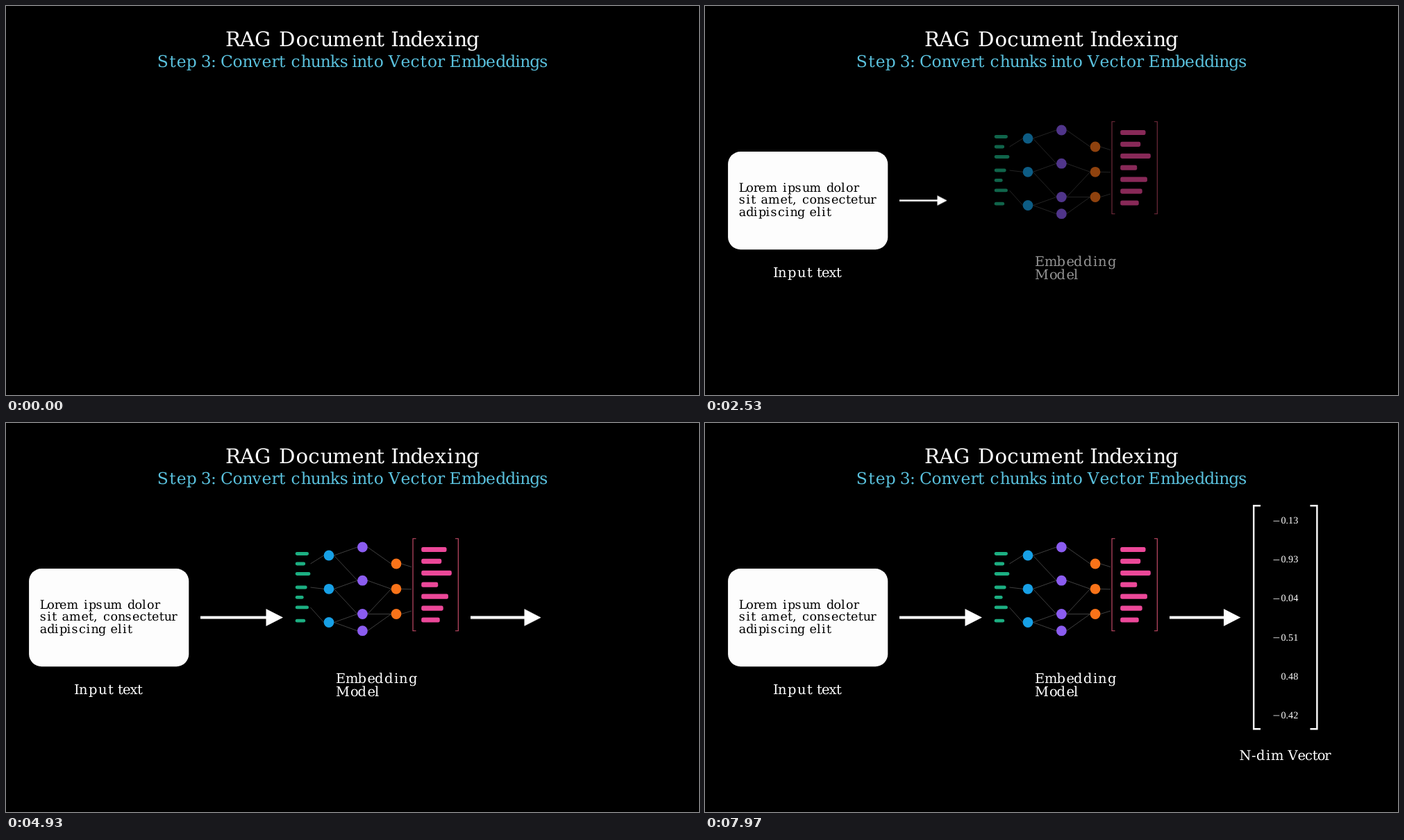
Animation, 998 px wide and 561 px high, one loop 8 s. Source, as an HTML page:

```html
<!DOCTYPE html>
<html lang="en">
<head>
<meta charset="utf-8">
<title>RAG Document Indexing</title>
<style>
  html, body { margin: 0; width: 100%; height: 100%; overflow: hidden; background: #000; }
  svg { display: block; width: 100vw; height: 100vh; }
  text { font-family: "DejaVu Serif", serif; fill: #fff; text-rendering: geometricPrecision; }
  .num { font: 14.2px "Liberation Serif", serif; text-anchor: end; }

  /* sigmoid ease, sampled every 5 % */
  .step {
    animation: 8s infinite both;
    animation-timing-function: linear(0, .0044, .0114, .0229, .0413, .0701, .114, .1781, .2658, .3759, .5,
      .6241, .7342, .8219, .886, .9299, .9587, .9771, .9886, .9956, 1);
  }
  #input { animation-name: fade-input; }
  #model { animation-name: fade-model; }
  #vector { animation-name: fade-vector; }
  #arrow1 { animation-name: grow-first; transform-origin: 280px 280.5px; }
  #arrow2 { animation-name: grow-second; transform-origin: 669px 280.5px; }
  @keyframes fade-input { 0% { opacity: 0 } 12.5%, 100% { opacity: 1 } }
  @keyframes fade-model { 0%, 25% { opacity: 0 } 37.5%, 100% { opacity: 1 } }
  @keyframes fade-vector { 0%, 62.5% { opacity: 0 } 75%, 100% { opacity: 1 } }
  @keyframes grow-first { 0%, 25% { transform: scale(0) } 37.5%, 100% { transform: scale(1) } }
  @keyframes grow-second { 0%, 50% { transform: scale(0) } 62.5%, 100% { transform: scale(1) } }

  /* each letter is outlined, then filled; the group hides the delayed wrap-around */
  #written { animation: reveal 8s linear infinite both; }
  #written tspan {
    stroke: #fff;
    stroke-dasharray: var(--len);
    animation: write 8s linear infinite;
  }
  @keyframes reveal { 0%, 75% { opacity: 0 } 75.01%, 100% { opacity: 1 } }
  @keyframes write {
    0%, 10%, 79.1667%, 100% { fill-opacity: 1; stroke-width: 0px; stroke-dashoffset: 0px }
    10.01%, 75% { fill-opacity: 0; stroke-width: 1.4px; stroke-dashoffset: var(--len) }
    77.0833% { fill-opacity: 0; stroke-width: 1.4px; stroke-dashoffset: 0px }
  }
</style>
</head>
<body>
<svg viewBox="0 0 998 561">
  <g id="heading"></g>
  <g id="input" class="step">
    <rect x="33.1" y="210.1" width="230.2" height="141.1" rx="18" fill="#fdfdfd"/>
  </g>
  <path id="arrow1" class="step" fill="#fff" d="M280 278.4H374.5V268L399 280.5 374.5 293V282.6H280Z"/>
  <g id="model" class="step">
    <path d="M590.5 166.7H586V299.7H590.5M647 166.7H651.3V299.7H647" fill="none" stroke="#d2506f" stroke-width="1.1"/>
  </g>
  <path id="arrow2" class="step" fill="#fff" d="M669 278.4H747V268L771.3 280.5 747 293V282.6H669Z"/>
  <g id="vector" class="step">
    <path d="M800 119.3H790.2V441.3H800M871.5 119.3H881.4V441.3H871.5" fill="none" stroke="#fff" stroke-width="2.4"/>
  </g>
  <g id="written"></g>
</svg>
<script>
  const $ = id => document.getElementById(id);
  function add(parent, tag, attrs, text = '') {
    const node = document.createElementNS('http://www.w3.org/2000/svg', tag);
    for (const key in attrs) node.setAttribute(key, attrs[key]);
    node.textContent = text;
    return parent.appendChild(node);
  }

  // Letter advances snap to a coarse grid; a block is centred on the ink of its widest line.
  const GRID = 561 / 160;
  const pen = document.createElement('canvas').getContext('2d');

  function layout(line, size) {
    let width = 0;
    const xs = [...line].map(char => {
      const x = width;
      width += Math.round(pen.measureText(char).width / GRID) * GRID;
      return x;
    });
    const left = -pen.measureText(line[0]).actualBoundingBoxLeft;
    const right = xs.at(-1) + pen.measureText(line.at(-1)).actualBoundingBoxRight;
    return { line, xs, left, right };
  }

  function write(parent, lines, points, centre, baseline, fill = '#fff') {
    const size = points * GRID / 3.6;
    pen.font = `${size}px "DejaVu Serif", serif`;
    const rows = lines.map(line => layout(line, size));
    const widest = rows.reduce((a, b) => b.right > a.right ? b : a);
    const origin = centre - (widest.left + widest.right) / 2;
    rows.forEach(({ line, xs }, row) => {
      const text = add(parent, 'text', { y: baseline + row * size, 'font-size': size });
      text.style.fill = fill;
      [...line].forEach((char, i) => add(text, 'tspan', { x: origin + xs[i] }, char));
    });
  }

  write($('heading'), ['RAG Document Indexing'], 30, 499, 57.5);
  write($('heading'), ['Step 3: Convert chunks into Vector Embeddings'], 24, 499, 88, '#5ac1dd');
  write($('input'), ['Lorem ipsum dolor', 'sit amet, consectetur', 'adipiscing elit'], 18, 148, 267.6, '#000');
  write($('input'), ['Input text'], 20, 148, 391);
  write($('model'), ['Embedding', 'Model'], 20, 534, 374.8);
  write($('written'), ['N-dim Vector'], 20, 835.8, 486);

  // rough outline lengths, so every stroke closes at the same moment
  const outline = { N: 100, '-': 16, i: 42, m: 95, V: 90 };
  [...$('written').querySelectorAll('tspan')]
    .filter(letter => letter.textContent.trim())
    .forEach((letter, i) => {
      letter.style.setProperty('--len', (outline[letter.textContent] || 62) + 'px');
      letter.style.animationDelay = i / 15 + 's';
    });

  const net = $('model');
  const layers = [
    { x: 465, color: '#17a0e6', ys: [191, 239.3, 287.5] },
    { x: 513.4, color: '#8b5cf0', ys: [179, 227.2, 275.5, 299.7] },
    { x: 562, color: '#f97319', ys: [203, 239.3, 275.5] }
  ];

  function link(x1, y1, x2, y2) {
    add(net, 'line', { x1, y1, x2, y2, stroke: '#505050', 'stroke-width': .8 });
  }
  function connect(from, to, pairs) {
    for (const [a, b] of pairs) link(from.x + 7.3, from.ys[a], to.x - 7.3, to.ys[b]);
  }
  function bars(x, height, fill, list) {
    for (const [y, width] of list)
      add(net, 'rect', { x, y: y - height / 2, width, height, rx: 2.4, fill });
  }

  [203, 237, 266].forEach((y, i) => link(438.5, y, 457.7, layers[0].ys[i]));
  connect(layers[0], layers[1], [[0, 0], [0, 1], [1, 1], [1, 2], [2, 2], [2, 3]]);
  connect(layers[1], layers[2], [[0, 0], [1, 1], [2, 1], [2, 2], [3, 2]]);
  [207.6, 239.8, 271].forEach((y, i) => link(569.3, layers[2].ys[i], 584, y));
  for (const { x, color, ys } of layers)
    for (const cy of ys) add(net, 'circle', { cx: x, cy, r: 7.4, fill: color });
  bars(416.7, 4.8, '#1caf82', [[188.5, 19.3], [203, 14.5], [217.5, 21.7], [237, 17], [251.4, 12], [265.9, 19.3], [285.2, 14.5]]);
  bars(598.2, 7.2, '#ec4899', [[182.5, 36.3], [199.4, 29], [216.3, 43.6], [233.2, 24], [250.2, 38.7], [267.1, 31.5], [284, 26.5]]);

  ['−0.13', '−0.93', '−0.04', '−0.51', '0.48', '−0.42'].forEach((value, i) => {
    const y = 140.4 + 56.1 * i;
    add($('vector'), 'text', { class: 'num', x: 854.3, y: y + 4.8 }, value.replace('−', ''));
    if (value[0] === '−')
      add($('vector'), 'path', { d: `M818.5 ${y + 1}h8.7`, stroke: '#fff', 'stroke-width': .8 });
  });
</script>
</body>
</html>
```
